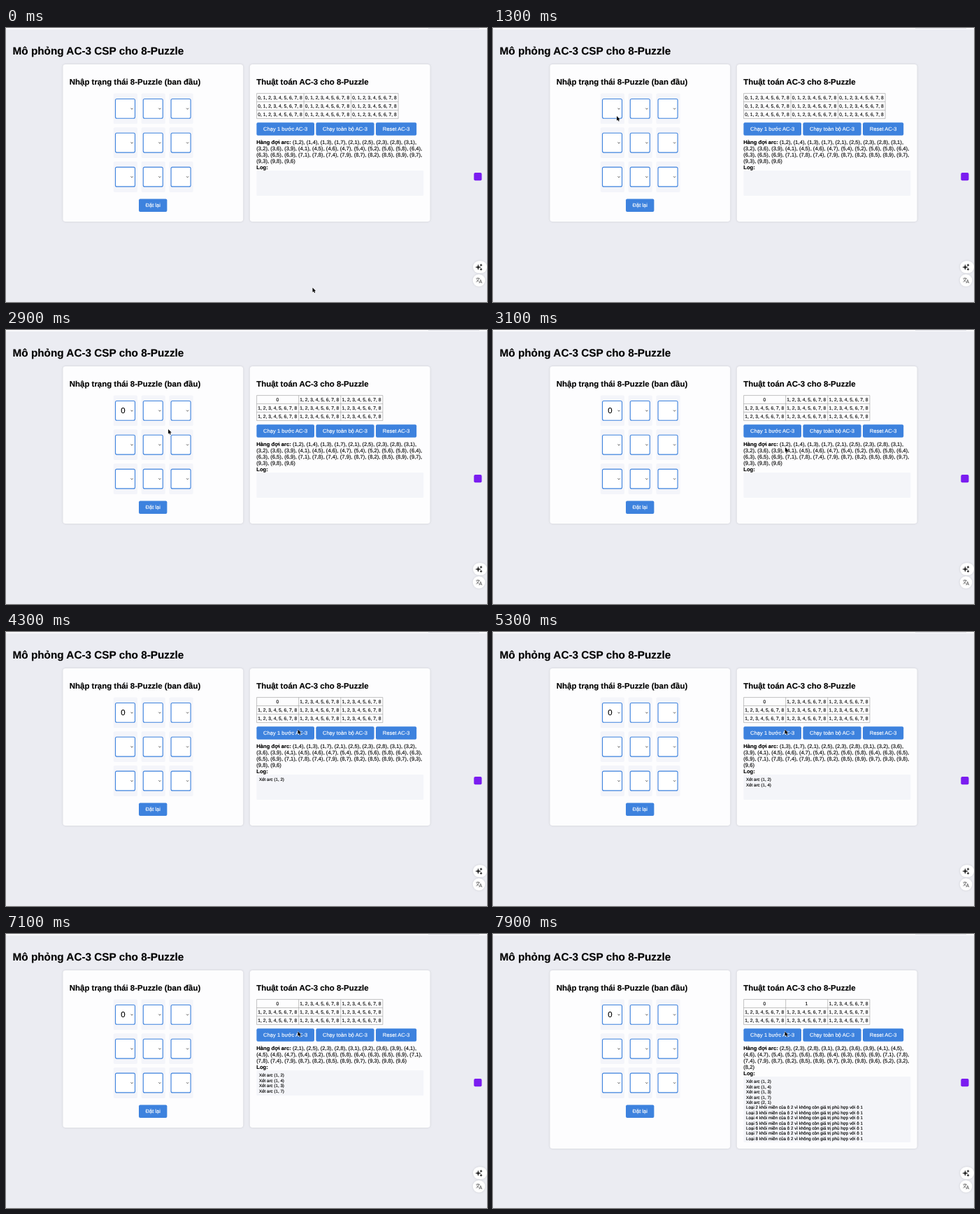
Recreate the animation shown at these times as an HTML page. Size 688 px wide and 392 px high, loop 8000 ms.

```html
<!DOCTYPE html>
<html lang="vi">
<head>
<meta charset="utf-8">
<title>AC-3 8-Puzzle</title>
<style>
html, body { margin: 0; width: 100%; height: 100%; overflow: hidden; background: #ebecf2; }
svg { display: block; font-family: "Liberation Sans", Arial, sans-serif; text-rendering: geometricPrecision; white-space: pre; }
text { stroke-width: .14; }
.panel { filter: drop-shadow(0 .8px 1.6px #0002); }
.menu { filter: drop-shadow(0 2px 3px #0005); }
</style>
</head>
<body>
<svg id="stage" width="688" height="392" viewBox="0 0 688 392"></svg>
<script>
const stage = document.getElementById('stage');
const LOOP = 8000, TICK = 100;
const BLUE = '#3d82de';

// cursor tip: time, x, y
const path = [
  [0, 438.5, 371.5], [200, 438.5, 371.5], [600, 343, 222], [800, 343, 222],
  [1300, 177, 126], [1900, 177, 126], [2200, 167, 133], [2800, 167, 133],
  [3100, 418, 168], [3500, 417.5, 139.5], [LOOP, 417.5, 139.5]
];
const clicks = [4300, 5300, 6000, 7100, 7900];
// neighbours of each cell, in queue order
const arcs = ['2437', '1538', '1269', '1567', '4268', '4359', '1849', '7259', '738' + '6']
  .flatMap((list, i) => [...list].map(n => [i + 1, +n]));

const rect = (x, y, w, h, fill, r = 0, more = '') =>
  `<rect x="${x}" y="${y}" width="${w}" height="${h}" rx="${r}" fill="${fill}" ${more}/>`;
const text = (x, y, size, s, more = '', color = '#000') =>
  `<text x="${x}" y="${y}" font-size="${size}" fill="${color}" stroke="${color}" ${more}>${s}</text>`;
const line = (d, color, w) =>
  `<path d="${d}" fill="none" stroke="${color}" stroke-width="${w}"/>`;
const bold = 'font-weight="700"', mid = 'text-anchor="middle"';

const button = (x, y, w, s) =>
  rect(x, y, w, 18.5, BLUE, 2) + text(x + w / 2, y + 11.9, 7.6, s, mid, '#fff');
const panel = (x, h) => rect(x, 52, 257.8, h, '#fdfdfe', 4, 'class="panel"');

function cursorAt(t) {
  const i = path.findIndex(k => k[0] > t);
  const [t0, x0, y0] = path[i - 1], [t1, x1, y1] = path[i];
  const u = (t - t0) / (t1 - t0), e = u * u * (3 - 2 * u);
  return [x0 + (x1 - x0) * e, y0 + (y1 - y0) * e];
}

function grid(chosen) {
  let out = '';
  for (let r = 0; r < 3; r++) for (let c = 0; c < 3; c++) {
    const x = 153.8 + c * 39.8, y = 93.5 + r * 48.8;
    out += rect(x, y, 34.2, 43.8, '#f4f5fa', 2)
      + rect(x + 2.7, y + 8, 28, 27.8, '#fff', 2, `stroke="${BLUE}" stroke-width="1.1"`)
      + line(`M${x + 24.7} ${y + 21.2}l1.5 1.6l1.5 -1.6`, '#333', .8);
  }
  return out + (chosen ? text(167.4, 119.4, 11.4, 0, mid) : '');
}

function domains(chosen, reduced) {
  const w = chosen ? 60.1 : 67.5, x = 358.6, y = 93.6;
  const all = (chosen ? '' : '0, ') + '1, 2, 3, 4, 5, 6, 7, 8';
  let out = '';
  for (let i = 0; i < 9; i++) {
    const s = i == 0 && chosen ? 0 : i == 1 && reduced ? 1 : all;
    out += text(x + (i % 3 + .5) * w - .4, y + (i / 3 | 0) * 12 + 8.3, 6.72, s, mid);
  }
  for (let i = 0; i < 4; i++)
    out += line(`M${x + i * w} ${y}v36M${x} ${y + i * 12}h${3 * w}`, '#999', .6);
  return out;
}

function queueLines(done) {
  const queue = arcs.slice(done);
  if (done > 4) queue.push([5, 2], [3, 2], [8, 2]);
  const lines = [];
  while (queue.length) {
    const part = queue.splice(0, lines.length ? 12 : 9);
    lines.push(part.map(a => `(${a})`).join(', ') + (queue.length ? ',' : ''));
  }
  return lines;
}

function logLines(done) {
  const log = arcs.slice(0, done).map(([a, b]) => `Xét arc (${a}, ${b})`);
  if (done > 4) for (let v = 2; v < 9; v++)
    log.push(`Loại ${v} khỏi miền của ô 2 vì không còn giá trị phù hợp với ô 1`);
  return log;
}

function menu(t) {
  const onZero = t >= 2000;
  let out = rect(152.6, 109, 29, 170, '#dcdcdc', 3.5, 'class="menu" stroke="#bbb" stroke-width=".4"')
    + (onZero ? rect(155, 122.5, 23.8, 16.8, '#4a98fb', 2.5) : rect(155, 111.5, 23.8, 10.8, '#4a98fb', 2.5))
    + line('M157.3 117.2l1.7 2.2l2.8 -5', onZero ? '#222' : '#fff', 1);
  for (let n = 0; n < 9; n++)
    out += text(167, 135.4 + n * 17.25, 12, n, mid, onZero && !n ? '#fff' : '#222');
  return out;
}

function sideIcons() {
  const star = (x, y, r) => `<path d="M${x} ${y - r}Q${x} ${y} ${x + r} ${y}Q${x} ${y} ${x} ${y + r}Q${x} ${y} ${x - r} ${y}Q${x} ${y} ${x} ${y - r}" fill="#222" stroke="#222" stroke-width=".6"/>`;
  return rect(669.3, 207, 11.2, 11.2, '#7a1cf0', 2)
    + rect(668, 333.2, 20, 17.6, '#fff', 8.8, 'class="panel"')
    + rect(667.7, 352.2, 17.6, 17.6, '#fff', 8.8, 'class="panel"')
    + star(675.4, 342.2, 3.6) + star(679.5, 339.2, 1.6) + star(679.5, 345.2, 1.6)
    + line('M672.3 358.2h5.4M675 357v1.2M676.9 358.2q-1 3.4 -4.4 5.2M673.4 359.6q1 2.4 3 3.4', '#444', .7)
    + line('M676.8 365.2l2 -5.2l2 5.2M677.5 363.6h2.6', '#444', .7);
}

function draw(t) {
  const chosen = t >= 2900, done = clicks.filter(c => t >= c).length;
  const queue = queueLines(done), log = logLines(done);
  const labelY = 166.2 + queue.length * 8.9, boxY = labelY + 2.3;
  const boxH = Math.max(36, log.length * 7.4 + 5);
  const panelH = Math.max(225, boxY + boxH + 9.2 - 52);
  const [cx, cy] = cursorAt(t);

  stage.innerHTML = rect(0, 0, 688, 392, '#ebecf2') + rect(0, 0, 688, 2, '#fbfbfd')
    + rect(604, 0, 73, 1, '#e3e4ea')
    + text(9.6, 38, 15.3, 'Mô phỏng AC-3 CSP cho 8-Puzzle', bold)
    + panel(81.4, panelH) + panel(348.8, panelH)
    + text(90.8, 81, 11.44, 'Nhập trạng thái 8-Puzzle (ban đầu)', bold)
    + text(358.3, 81, 11.44, 'Thuật toán AC-3 cho 8-Puzzle', bold)
    + grid(chosen) + button(190, 244.5, 40.4, 'Đặt lại')
    + domains(chosen, done > 4)
    + button(358.4, 135.3, 82.6, 'Chạy 1 bước AC-3')
    + button(443.4, 135.3, 83.2, 'Chạy toàn bộ AC-3')
    + button(529, 135.3, 58.2, 'Reset AC-3')
    + queue.map((s, i) => text(358.3, 166.2 + i * 8.9, 7.63,
        (i ? '' : `<tspan ${bold}>Hàng đợi arc:</tspan> `) + s)).join('')
    + text(358.3, labelY, 7.63, 'Log:', bold)
    + rect(358.4, boxY, 238.8, boxH, '#f4f5f9', 1)
    + log.map((s, i) => text(362, boxY + 9.2 + i * 7.4, 6.23, s)).join('')
    + sideIcons()
    + (t >= 1700 && !chosen ? menu(t) : '')
    + `<path transform="translate(${cx} ${cy})" d="M0 0V6.6L1.5 5.2L2.6 7.6L3.7 7.1L2.7 4.8H4.7Z" stroke="#fff" stroke-width=".7" paint-order="stroke"/>`;
}

let last = -1;
function frame() {
  const t = Math.floor(performance.now() % LOOP / TICK) * TICK;
  if (t != last) draw(last = t);
  requestAnimationFrame(frame);
}
frame();
</script>
</body>
</html>
```
